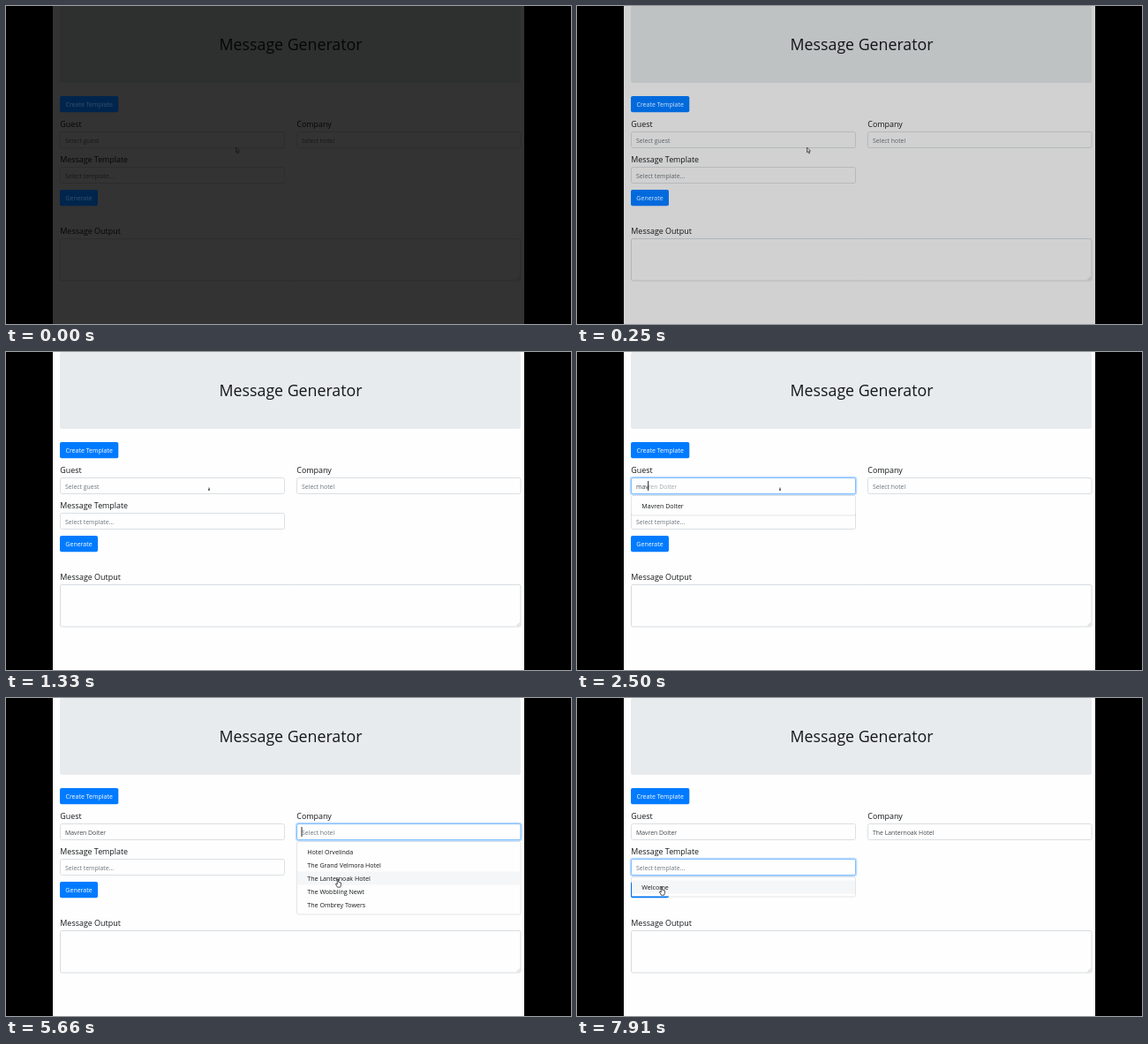
An HTML page with a canvas for the animation above (8000 ms loop, 640 px wide and 360 px high).

```html
<!DOCTYPE html>
<html lang="en">
<head>
<meta charset="utf-8">
<title>Message Generator</title>
<style>
  html, body { margin: 0; width: 100%; height: 100%; overflow: hidden; background: #000; }
  canvas { display: block; width: 640px; height: 360px; }
</style>
</head>
<body>
<canvas id="stage" width="640" height="360"></canvas>
<script>
const ctx = document.getElementById('stage').getContext('2d');
const LOOP = 8000, STEP = 1000 / 12;
const INK = '#15181b', VALUE = '#42484e', HINT = '#6c757d', BORDER = '#d3d8dd';

const GUEST = 'Mavren Dolter';
const HOTELS = ['Hotel Orvelinda', 'The Grand Velmora Hotel', 'The Lanternoak Hotel',
  'The Wobbling Newt', 'The Ombrey Towers'];

const fields = {
  guest: { x: 61.5, y: 142.5, w: 254, h: 18, hint: 'Select guest' },
  company: { x: 329.5, y: 142.5, w: 253.5, h: 18, hint: 'Select hotel' },
  template: { x: 61.5, y: 182.5, w: 254, h: 18, hint: 'Select template...' }
};

// Moments of the interaction, in ms
const AT = { guest: 1500, type: [1830, 2080, 2330], guestPick: 3160,
  company: 4080, companyPick: 6000, template: 7000 };

// Pointer path: time, x, y
const PATH = [
  [0, 260.5, 160], [950, 260.5, 160], [1330, 230, 155], [2580, 230, 155],
  [3000, 104, 173], [3250, 104, 173], [3830, 382.5, 157], [4250, 382.5, 157],
  [4800, 380, 175], [5580, 376, 205], [6080, 376, 205], [6800, 150, 191],
  [7080, 150, 191], [7750, 96, 214]
];

function pointer(t) {
  const i = PATH.findIndex(p => p[0] > t);
  if (i < 0) return PATH[PATH.length - 1].slice(1);
  const [t0, x0, y0] = PATH[i - 1], [t1, x1, y1] = PATH[i];
  const u = (t - t0) / (t1 - t0), e = u * u * (3 - 2 * u);
  return [x0 + (x1 - x0) * e, y0 + (y1 - y0) * e];
}

function text(str, x, y, size, color, align = 'left') {
  ctx.font = `${size}px "Open Sans", "Noto Sans", sans-serif`;
  ctx.textAlign = align;
  ctx.fillStyle = color;
  ctx.fillText(str, x, y);
  return ctx.measureText(str).width;
}

function box(x, y, w, h, r, fill, stroke, line = 1) {
  ctx.beginPath();
  ctx.roundRect(x, y, w, h, r);
  if (fill) { ctx.fillStyle = fill; ctx.fill(); }
  if (stroke) { ctx.strokeStyle = stroke; ctx.lineWidth = line; ctx.stroke(); }
}

function shape(points, fill, line) {
  ctx.beginPath();
  points.forEach(([x, y]) => ctx.lineTo(x, y));
  ctx.closePath();
  ctx.fillStyle = fill;
  ctx.fill();
  ctx.strokeStyle = '#111';
  ctx.lineWidth = line;
  ctx.stroke();
}

function field(f, { typed = '', rest = '', focused, caret }) {
  if (focused) box(f.x - .5, f.y - .5, f.w + 1, f.h + 1, 2.5, null, 'rgba(0,123,255,.25)', 2.5);
  box(f.x, f.y, f.w, f.h, 2, '#fefefe', focused ? '#80bdff' : BORDER, focused ? 1 : .8);
  const x = f.x + 5.5, y = f.y + 12;
  const w = typed ? text(typed, x, y, 6.9, VALUE) : 0;
  if (rest || !typed) text(rest || f.hint, x + w, y, 6.9, rest ? '#a3a8ad' : HINT);
  if (caret) {
    ctx.fillStyle = '#222';
    ctx.fillRect(x + w - .5, f.y + 3.5, 1, 11);
  }
}

function menu(f, items, [px, py]) {
  const y = f.y + f.h + 2, h = items.length * 15 + 7.5;
  ctx.fillStyle = '#fefefe';
  ctx.fillRect(f.x + .5, y + .5, f.w - 1, h - 1);
  box(f.x, y, f.w, h, 2, null, 'rgba(0,0,0,.11)', .9);
  items.forEach((item, i) => {
    const top = y + 4 + i * 15;
    if (px > f.x && px < f.x + f.w && py >= top && py < top + 15) {
      ctx.fillStyle = '#f5f6f8';
      ctx.fillRect(f.x + .5, top, f.w - 1, 15);
    }
    text(item, f.x + 11.8, top + 10, 7.1, INK);
  });
}

function button(label, x, y, w, h, level) {
  const s = level ** .75;
  box(x, y, w, h, 2, `rgb(0,${123 * s},${255 * s})`);
  text(label, x + w / 2, y + h / 2 + 2.6, 7, `rgba(255,255,255,${level})`, 'center');
}

function drawPointer([x, y], kind, level) {
  const white = `rgb(${[255, 255, 255].map(c => c * level)})`;
  ctx.save();
  ctx.translate(x, y);
  if (kind === 'beam') {
    ctx.fillStyle = '#222';
    ctx.fillRect(-.4, -1.5, .8, 3);
    ctx.fillRect(-1, .5, 2, 1);
  } else if (kind === 'hand') {
    shape([[-.8, 0], [.5, 0], [.5, 3.2], [3.4, 4], [3.4, 7], [2.6, 9.2],
      [-.6, 9.2], [-2.6, 5.6], [-1.8, 5], [-.8, 6]], white, .7);
  } else {
    shape([[0, 0], [0, 5.8], [1.3, 4.7], [2.3, 7], [3.2, 6.5], [2.3, 4.3], [4, 4.2]], white, .6);
  }
  ctx.restore();
}

function render(t) {
  const level = Math.min(1, .2 + .0025 * t);
  const pos = pointer(t);
  const focus = t >= AT.template ? 'template' : t >= AT.company ? 'company' : t >= AT.guest ? 'guest' : '';
  const keys = AT.type.filter(k => t >= k).length;
  const guestDone = t >= AT.guestPick, companyDone = t >= AT.companyPick;
  const lastInput = [AT.guest, ...AT.type, AT.guestPick, AT.company, AT.companyPick, AT.template]
    .filter(k => t >= k).pop();
  const blink = Math.floor((t - lastInput) / 530) % 2 === 0;

  ctx.fillStyle = '#000';
  ctx.fillRect(0, 0, 640, 360);
  ctx.fillStyle = '#fefefe';
  ctx.fillRect(53, 0, 534, 360);
  box(61, 0, 522, 87, 2.5, '#e8ebed');
  text('Message Generator', 322.5, 49.8, 17.75, INK, 'center');
  text('Guest', 61.3, 137, 8.9, INK);
  text('Company', 329.3, 137, 8.9, INK);
  text('Message Template', 61.3, 177.3, 8.9, INK);
  text('Message Output', 61.3, 257.9, 8.95, INK);

  const states = {
    guest: guestDone ? { typed: GUEST }
      : keys ? { typed: GUEST.slice(0, keys).toLowerCase(), rest: GUEST.slice(keys) } : {},
    company: companyDone ? { typed: HOTELS[2] } : {},
    template: {}
  };
  for (const name in fields) {
    const focused = focus === name;
    field(fields[name], { ...states[name], focused, caret: focused && blink });
  }

  box(61.5, 263.5, 521.5, 47.5, 2, '#fefefe', BORDER, .9);
  ctx.strokeStyle = '#aaa';
  ctx.lineWidth = .6;
  ctx.beginPath();
  ctx.moveTo(578.5, 310); ctx.lineTo(582, 306.5);
  ctx.moveTo(580.5, 310); ctx.lineTo(582, 308.5);
  ctx.stroke();

  ctx.fillStyle = `rgba(0,0,0,${1 - level})`;
  ctx.fillRect(53, 0, 534, 360);
  button('Create Template', 61, 102, 66.3, 18.3, level);
  button('Generate', 61, 208, 43, 18.2, level);

  const options = focus === 'guest' && keys && !guestDone ? [GUEST]
    : focus === 'company' && !companyDone ? HOTELS
    : focus === 'template' ? ['Welcome'] : null;
  if (options) menu(fields[focus], options, pos);

  const [x, y] = pos;
  const inside = (f, top, bottom) => x > f.x && x < f.x + f.w && y > f.y + top && y < f.y + bottom;
  const overMenu = options && inside(fields[focus], 22, 26 + options.length * 15);
  const overField = Object.values(fields).some(f => inside(f, 4, 14));
  drawPointer(pos, overMenu ? 'hand' : overField ? 'beam' : 'arrow', level);
}

let start;
function tick(now) {
  start ??= now;
  const t = (now - start) % LOOP;
  render(Math.floor((t + 7) / STEP) % 96 * STEP);
  requestAnimationFrame(tick);
}
requestAnimationFrame(tick);
</script>
</body>
</html>
```
